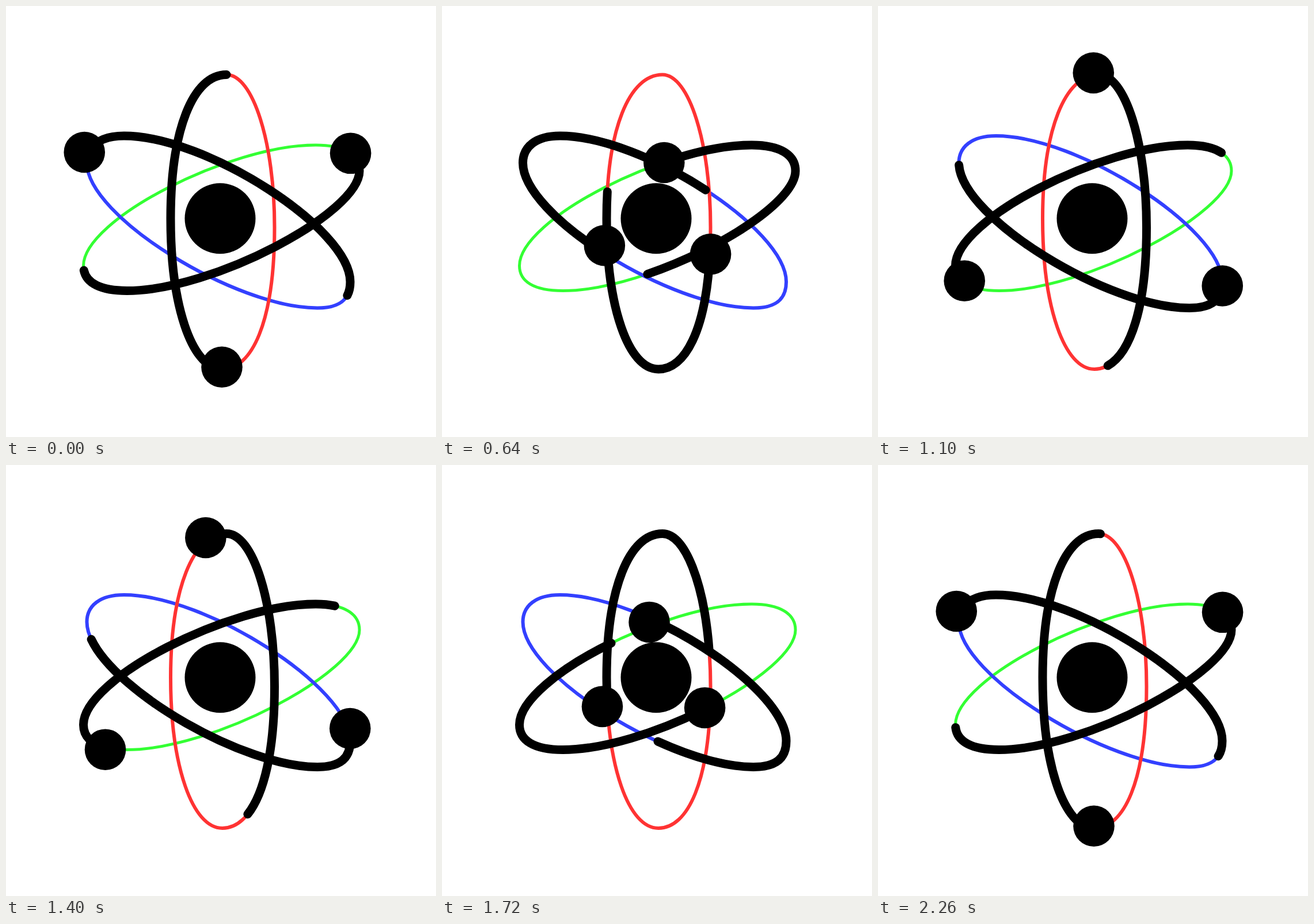
An HTML page that plays this animation: 747 px wide and 750 px high, repeating every 2280 ms.

```html
<!DOCTYPE html>
<html>
<head>
<meta charset="utf-8">
<style>
  html, body { margin: 0; width: 100%; height: 100%; overflow: hidden; background: #fff; }
  svg { display: block; width: 747px; height: 750px; }
  path { fill: none; }
</style>
</head>
<body>
<svg viewBox="0 0 747 750"><circle cx="372" cy="369.7" r="61.5"/></svg>
<script>
const svg = document.querySelector('svg');
const STEP = 20, STEPS = 114, HALF = 1130;
const LEFT = 0, BOTTOM = 1, RIGHT = 2, TOP = 3;
const TANGENTS = [[0, 1], [1, 0], [0, -1], [-1, 0]];

// Closed counter-clockwise loop through its four extremes: [x, y, handle in, handle out].
function loop(first, ...nodes) {
  const handle = (i, sign) => {
    const [x, y, hin, hout] = nodes[i % 4], [dx, dy] = TANGENTS[(first + i) % 4];
    const h = sign < 0 ? -hin : hout;
    return `${x + dx * h} ${y + dy * h}`;
  };
  let d = `M${nodes[0][0]} ${nodes[0][1]}`;
  for (let i = 0; i < 4; i++) {
    const [x, y] = nodes[(i + 1) % 4];
    d += `C${handle(i, 1)} ${handle(i + 1, -1)} ${x} ${y}`;
  }
  return d + 'Z';
}

function add(tag, attrs) {
  const el = document.createElementNS('http://www.w3.org/2000/svg', tag);
  for (const key in attrs) el.setAttribute(key, attrs[key]);
  return svg.appendChild(el);
}

const orbits = [
  { color: '#33ff33', width: 5, trailStart: .007, ballStart: .02,
    ring: loop(LEFT, [134.5, 452, 80, 27], [210, 495.5, 51, 150], [614, 287, 73, 27], [538, 242, 51, 150]),
    track: loop(RIGHT, [603.5, 278, 75, 26], [540, 236, 50, 150], [142, 452, 58, 26], [212, 502, 50, 150]) },
  { color: '#3340ff', width: 6, trailStart: -.021, ballStart: -.012,
    ring: loop(RIGHT, [598, 480, 28, 93], [205, 226, 142, 42], [140.5, 273, 28, 93], [541, 525.5, 142, 42]),
    track: loop(LEFT, [133.8, 268, 23, 77], [546, 513, 142, 38], [600.3, 474, 23, 87], [190, 229, 142, 38]) },
  { color: '#ff3333', width: 6, trailStart: 0, ballStart: 0,
    ring: loop(TOP, [383, 119.5, 46, 58], [286, 370, 155, 155], [376, 632, 52, 50], [466.5, 385, 168, 147]),
    track: loop(BOTTOM, [375, 628.3, 52, 50], [468, 382, 165, 147], [381, 116, 46, 62], [276.5, 368, 160, 150]) },
];

for (const o of orbits) add('path', { d: o.ring, stroke: o.color, 'stroke-width': o.width });
for (const o of orbits) {
  o.trail = add('path', { d: o.ring, stroke: '#000', 'stroke-width': 15, 'stroke-linecap': 'round',
    pathLength: 1, 'stroke-dasharray': '.5 .5' });
  o.path = add('path', { d: o.track });
  o.length = o.path.getTotalLength();
  o.ball = add('circle', { r: 35.8 });
}

// Cubic-bezier easing (a, 0, b, 1).
function ease(x, a, b) {
  let lo = 0, hi = 1, s;
  for (let i = 0; i < 30; i++) {
    s = (lo + hi) / 2;
    const r = 1 - s;
    if (3 * a * s * r * r + 3 * b * s * s * r + s ** 3 < x) lo = s; else hi = s;
  }
  return s * s * (3 - 2 * s);
}

const progress = (t, mid, end) => t < HALF
  ? mid * ease(t / HALF, .85, .41)
  : mid + (end - mid) * ease((t - HALF) / HALF, .74, .26);

const wrap = v => ((v % 1) + 1) % 1;

function draw(now) {
  const t = Math.floor(now / STEP) % STEPS * STEP;
  const tail = progress(t, .525, .997), turn = progress(t, .5, 1);
  for (const o of orbits) {
    o.trail.setAttribute('stroke-dashoffset', 1 - wrap(tail + o.trailStart));
    const p = o.path.getPointAtLength(wrap(turn + o.ballStart) * o.length);
    o.ball.setAttribute('cx', p.x);
    o.ball.setAttribute('cy', p.y);
  }
}

const start = performance.now();
function tick() {
  draw(performance.now() - start);
  requestAnimationFrame(tick);
}
tick();
</script>
</body>
</html>
```
